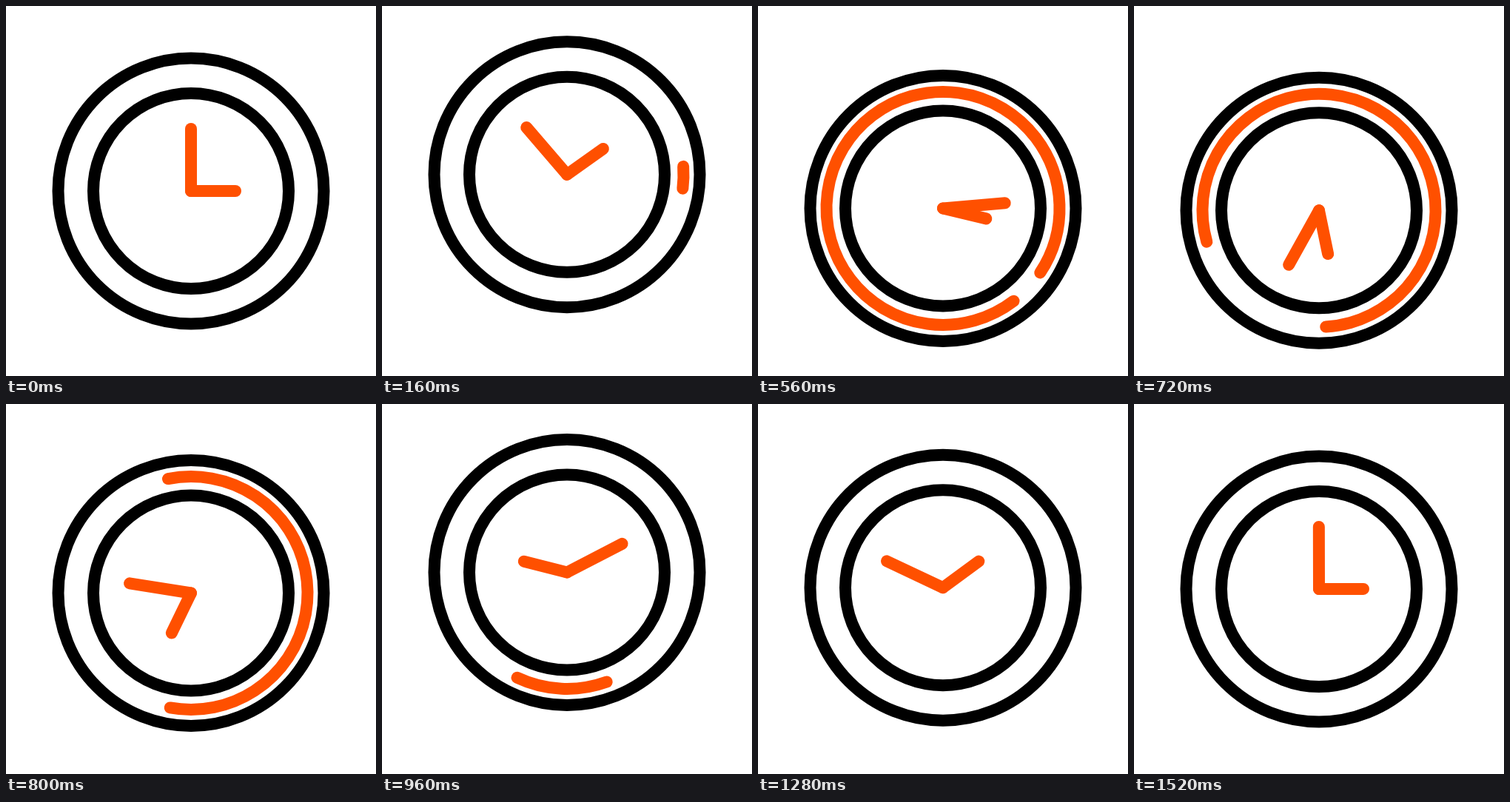
Write an HTML page with a canvas that moves like this. It is 500 px wide and 500 px high and loops after 2 s.

```html
<!DOCTYPE html>
<html lang="en">
<head>
<meta charset="utf-8">
<title>Clock</title>
<style>
  html, body { margin: 0; width: 100%; height: 100%; overflow: hidden; background: #fff; }
  canvas { display: block; width: 100vmin; height: 100vmin; }
</style>
</head>
<body>
<canvas id="stage"></canvas>
<script>
const LOOP = 2000, STEP = 80, LAST_POSE = 1520;
const BLACK = '#000', ORANGE = '#ff5000';
const canvas = document.getElementById('stage');
const ctx = canvas.getContext('2d');
const scale = window.devicePixelRatio || 1;
canvas.width = canvas.height = 500 * scale;

// Keyframes are [time in ms, value] pairs.
const bounce = [[0, 250], [320, 205.5], [640, 283.5], [960, 227.5], [1360, 250]];
const minuteAngle = [[0, 0], [200, -45], [1530, 720]];
const hourAngle = [[0, 90], [230, 45], [240, 45], [1530, 450]];
const arcHead = [[100, 0], [640, 360]];
const arcTail = [[560, 0], [1080, 360]];
const arcTurn = [[150, -4], [1000, 116]];

const sine = x => (1 - Math.cos(Math.PI * x)) / 2;

// Cubic ease with control points (.42, 0) and (.58, 1).
function easeInOut(x) {
  let low = 0, high = 1;
  for (let i = 0; i < 20; i++) {
    const s = (low + high) / 2, r = 1 - s;
    if (1.26 * s * r * r + 1.74 * s * s * r + s * s * s < x) low = s;
    else high = s;
  }
  return low * low * (3 - 2 * low);
}

function valueAt(keys, t, ease = sine) {
  if (t <= keys[0][0]) return keys[0][1];
  for (let i = 1; i < keys.length; i++) {
    const [t0, v0] = keys[i - 1], [t1, v1] = keys[i];
    if (t < t1) return v0 + (v1 - v0) * ease((t - t0) / (t1 - t0));
  }
  return keys[keys.length - 1][1];
}

const radians = degrees => degrees * Math.PI / 180;

function arc(radius, color, from = 0, to = 360) {
  ctx.strokeStyle = color;
  ctx.beginPath();
  ctx.arc(0, 0, radius, radians(from), radians(to));
  ctx.stroke();
}

function hand(length, angle) {
  const a = radians(angle);
  ctx.strokeStyle = ORANGE;
  ctx.beginPath();
  ctx.moveTo(0, 0);
  ctx.lineTo(length * Math.sin(a), -length * Math.cos(a));
  ctx.stroke();
}

function draw(t) {
  ctx.setTransform(scale, 0, 0, scale, 0, 0);
  ctx.fillStyle = '#fff';
  ctx.fillRect(0, 0, 500, 500);
  ctx.translate(250, valueAt(bounce, t, easeInOut));
  ctx.lineWidth = 16;
  ctx.lineCap = 'round';

  arc(179.5, BLACK);
  arc(132, BLACK);

  const head = valueAt(arcHead, t), tail = valueAt(arcTail, t);
  if (head - tail > 0.1) {
    const turn = valueAt(arcTurn, t);
    arc(157.5, ORANGE, turn + tail, turn + head);
  }

  hand(84, valueAt(minuteAngle, t));
  hand(60, valueAt(hourAngle, t));
}

function frame() {
  const t = performance.now() % LOOP;
  draw(Math.min(Math.floor(t / STEP) * STEP, LAST_POSE));
  requestAnimationFrame(frame);
}
draw(0);
requestAnimationFrame(frame);
</script>
</body>
</html>
```
